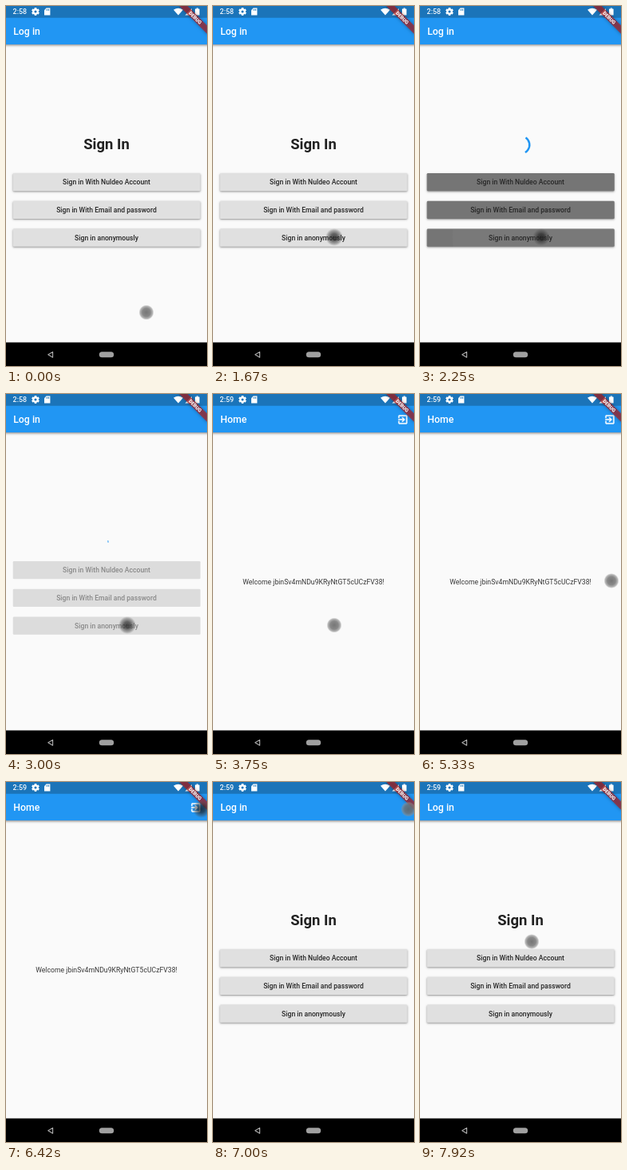
An HTML page with a canvas that plays this animation: 252 px wide and 450 px high, repeating every 8000 ms.

```html
<!DOCTYPE html>
<html lang="en">
<head>
<meta charset="utf-8">
<title>Sign in demo</title>
<style>
  html, body { margin: 0; width: 100%; height: 100%; overflow: hidden; background: #fafafa; }
  canvas { display: block; width: 252px; height: 450px; }
</style>
</head>
<body>
<canvas id="stage"></canvas>
<script>
const W = 252, H = 450, LOOP = 8000, STEP = 1000 / 12;
const LOADING = 2083, HOME = 3583, LOGOUT = 6917;
const canvas = document.getElementById('stage');
const ctx = canvas.getContext('2d');
const dpr = window.devicePixelRatio || 1;
canvas.width = W * dpr;
canvas.height = H * dpr;

const EXIT_ICON = new Path2D('M10.09 15.59L11.5 17l5-5-5-5-1.41 1.41L12.67 11H3v2h9.67l-2.58 2.59z' +
  'M19 3H5c-1.11 0-2 .9-2 2v4h2V5h14v14H5v-4H3v4c0 1.1.89 2 2 2h14c1.1 0 2-.9 2-2V5c0-1.1-.9-2-2-2z');

const BUTTONS = [
  { y: 209, label: 'Sign in With Nuldeo Account' },
  { y: 243.7, label: 'Sign in With Email and password' },
  { y: 278.4, label: 'Sign in anonymously' }
];

// Pointer moves: start, end, from, to
const MOVES = [
  [0, 530, [176, 383], [152, 289]],
  [4500, 5333, [152, 288.5], [240, 233.5]],
  [5333, 5750, [240, 233.5], [214, 180]],
  [5833, 6400, [214, 180], [245, 34]],
  [7667, 7917, [245, 34], [140, 199.5]]
];

const clamp = v => Math.max(0, Math.min(1, v));
const smooth = v => v * v * (3 - 2 * v);
const mix = (a, b, k) => a + (b - a) * k;
const within = (t, a, b) => t >= a && t < b;

// cubic-bezier(.4, 0, .2, 1)
function fastOutSlowIn(x) {
  let lo = 0, hi = 1, s = 0.5;
  for (let i = 0; i < 20; i++) {
    s = (lo + hi) / 2;
    const bx = 1.2 * s * (1 - s) ** 2 + 0.6 * s * s * (1 - s) + s ** 3;
    if (bx < x) lo = s; else hi = s;
  }
  return smooth(s);
}

function rect(x, y, w, h, fill, r = 0) {
  ctx.fillStyle = fill;
  ctx.beginPath();
  ctx.roundRect(x, y, w, h, r);
  ctx.fill();
}

function poly(points, fill) {
  ctx.fillStyle = fill;
  ctx.beginPath();
  points.forEach(([x, y]) => ctx.lineTo(x, y));
  ctx.closePath();
  ctx.fill();
}

function disc(x, y, r, fill) {
  ctx.fillStyle = fill;
  ctx.beginPath();
  ctx.arc(x, y, r, 0, 2 * Math.PI);
  ctx.fill();
}

function text(str, x, y, size, weight, fill, align = 'center') {
  ctx.font = `${weight} ${size}px Roboto, sans-serif`;
  ctx.textAlign = align;
  ctx.fillStyle = fill;
  ctx.fillText(str, x, y);
}

function shadow(blur, dy, color) {
  ctx.shadowColor = color;
  ctx.shadowBlur = blur * dpr;
  ctx.shadowOffsetY = dy * dpr;
}

function appBar(title) {
  ctx.save();
  shadow(3, 1, 'rgba(0,0,0,.5)');
  rect(-5, 0, W + 10, 48, '#2196f3');
  ctx.restore();
  rect(0, 0, W, 14.7, '#1b74b9');
  text(title, 9.2, 36, 12.3, 500, '#fff', 'left');
}

function ribbon() {
  ctx.save();
  ctx.translate(W, 0);
  ctx.rotate(Math.PI / 4);
  ctx.save();
  shadow(4, 0, 'rgba(0,0,0,.5)');
  rect(-26, 17.2, 52, 7.4, 'rgba(183,28,28,.66)');
  ctx.restore();
  text('DEBUG', 0, 23.1, 6.2, 900, '#fff');
  ctx.restore();
}

function gear(x, y) {
  ctx.save();
  ctx.translate(x, y);
  for (let i = 0; i < 6; i++) {
    rect(-1.3, -4.9, 2.6, 3, '#fff', 0.4);
    ctx.rotate(Math.PI / 3);
  }
  ctx.strokeStyle = '#fff';
  ctx.lineWidth = 2.2;
  ctx.beginPath();
  ctx.arc(0, 0, 2.7, 0, 2 * Math.PI);
  ctx.stroke();
  ctx.restore();
}

function statusBar(clock) {
  text(clock, 8.6, 10.4, 8.9, 500, '#f4f8fc', 'left');
  gear(37, 7);
  poly([[50.5, 2.6], [55.4, 2.6], [55.4, 11.6], [48, 11.6], [48, 5.2]], '#fff');
  for (let i = 0; i < 3; i++) rect(50.4 + i * 1.5, 3.7, 0.8, 2, '#1b74b9');
  ctx.fillStyle = '#fff';
  ctx.beginPath();
  ctx.moveTo(216, 11.6);
  ctx.lineTo(210, 4.8);
  ctx.quadraticCurveTo(216, 0.9, 222, 4.8);
  ctx.fill();
  poly([[224.5, 11.4], [233, 11.4], [233, 3]], '#fff');
  rect(237, 3.4, 5.6, 8.2, '#fff', 0.6);
  rect(238.7, 2.5, 2.2, 1.2, '#fff');
}

function navBar() {
  rect(0, 420.6, W, 30, '#000');
  ctx.strokeStyle = '#b0b0b0';
  ctx.lineWidth = 1.1;
  ctx.lineJoin = 'round';
  ctx.beginPath();
  ctx.moveTo(52.8, 435.8);
  ctx.lineTo(58.6, 432.4);
  ctx.lineTo(58.6, 439.2);
  ctx.closePath();
  ctx.stroke();
  rect(116.8, 432.3, 18.4, 7, '#a0a0a0', 3.5);
}

function spinner(t) {
  const p = (t - LOADING - 7) / 1000;
  const cycle = Math.max(0, Math.floor(p)), f = clamp(p - cycle);
  const head = fastOutSlowIn(clamp(f * 2)), tail = fastOutSlowIn(clamp(f * 2 - 1));
  const start = Math.PI * (-0.583 + 1.5 * tail + 1.7 * f - 0.8 * cycle);
  ctx.strokeStyle = '#2196f3';
  ctx.lineWidth = 2.45;
  ctx.beginPath();
  ctx.arc(126.3, 173.5, 11, start, start + Math.max(0.01, 1.5 * Math.PI * (head - tail)));
  ctx.stroke();
}

function button({ y, label }, t, loading) {
  const age = t - LOADING;
  const raised = !loading || age < 230;
  let grey = 224, ink = 'rgba(0,0,0,.84)';
  if (loading) {
    grey = age < 230 ? mix(224, 117, clamp(age / 167)) : 220;
    ink = age < 230 ? 'rgba(0,0,0,.68)' : 'rgba(0,0,0,.38)';
  }
  ctx.save();
  if (raised) shadow(2.4, 1, 'rgba(0,0,0,.42)');
  rect(8.7, y, 235, 22.3, `rgb(${grey},${grey},${grey})`, 1.3);
  ctx.restore();
  if (y > 270 && within(t, 1910, 2420)) {
    ctx.save();
    ctx.beginPath();
    ctx.roundRect(8.7, y, 235, 22.3, 1.3);
    ctx.clip();
    disc(152, 289, (t - 1880) * 0.3, 'rgba(190,190,190,.06)');
    ctx.restore();
  }
  text(label, 126, y + 14.2, 8.65, 500, ink);
}

function loginPage(t) {
  const loading = within(t, LOADING, HOME);
  appBar('Log in');
  if (loading) spinner(t);
  else text('Sign In', 126, 178.6, 18.5, 700, '#212121');
  BUTTONS.forEach(b => button(b, t, loading));
}

function homePage() {
  appBar('Home');
  ctx.save();
  ctx.translate(230.6, 24.6);
  ctx.scale(0.613, 0.613);
  ctx.fillStyle = ctx.strokeStyle = '#fff';
  ctx.lineWidth = 0.6;
  ctx.fill(EXIT_ICON);
  ctx.stroke(EXIT_ICON);
  ctx.restore();
  text('Welcome jbinSv4mNDu9KRyNtGT5cUCzFV38!', 126, 238, 8.68, 400, 'rgba(0,0,0,.78)');
}

function pointer(t) {
  let [x, y] = MOVES[0][2];
  for (const [a, b, from, to] of MOVES) {
    if (t < a) break;
    const k = smooth(clamp((t - a) / (b - a)));
    x = mix(from[0], to[0], k);
    y = mix(from[1], to[1], k);
  }
  const pressed = within(t, 575, HOME) || within(t, 6410, LOGOUT);
  const r = pressed ? 11 : 9.5;
  const g = ctx.createRadialGradient(x, y, 0, x, y, r);
  const stops = pressed
    ? [[0, 'rgba(20,20,20,.75)'], [0.4, 'rgba(35,35,35,.66)'], [0.75, 'rgba(70,70,70,.4)'], [1, 'rgba(90,90,90,0)']]
    : [[0, 'rgba(100,100,100,.88)'], [0.55, 'rgba(112,112,112,.82)'], [0.82, 'rgba(135,135,135,.6)'], [1, 'rgba(150,150,150,0)']];
  stops.forEach(([at, color]) => g.addColorStop(at, color));
  disc(x, y, r, g);
}

function draw(t) {
  const home = within(t, HOME, LOGOUT - 5);
  ctx.setTransform(dpr, 0, 0, dpr, 0, 0);
  rect(0, 0, W, H, '#fafafa');
  if (home) homePage();
  else loginPage(t);
  statusBar(t < HOME ? '2:58' : '2:59');
  ribbon();
  navBar();
  pointer(t);
}

const begin = performance.now();
function tick() {
  const ms = (performance.now() - begin) % LOOP;
  // The screen refreshes twelve times a second
  draw(Math.floor((ms + 5) / STEP) * STEP + 1);
  requestAnimationFrame(tick);
}
tick();
</script>
</body>
</html>
```
